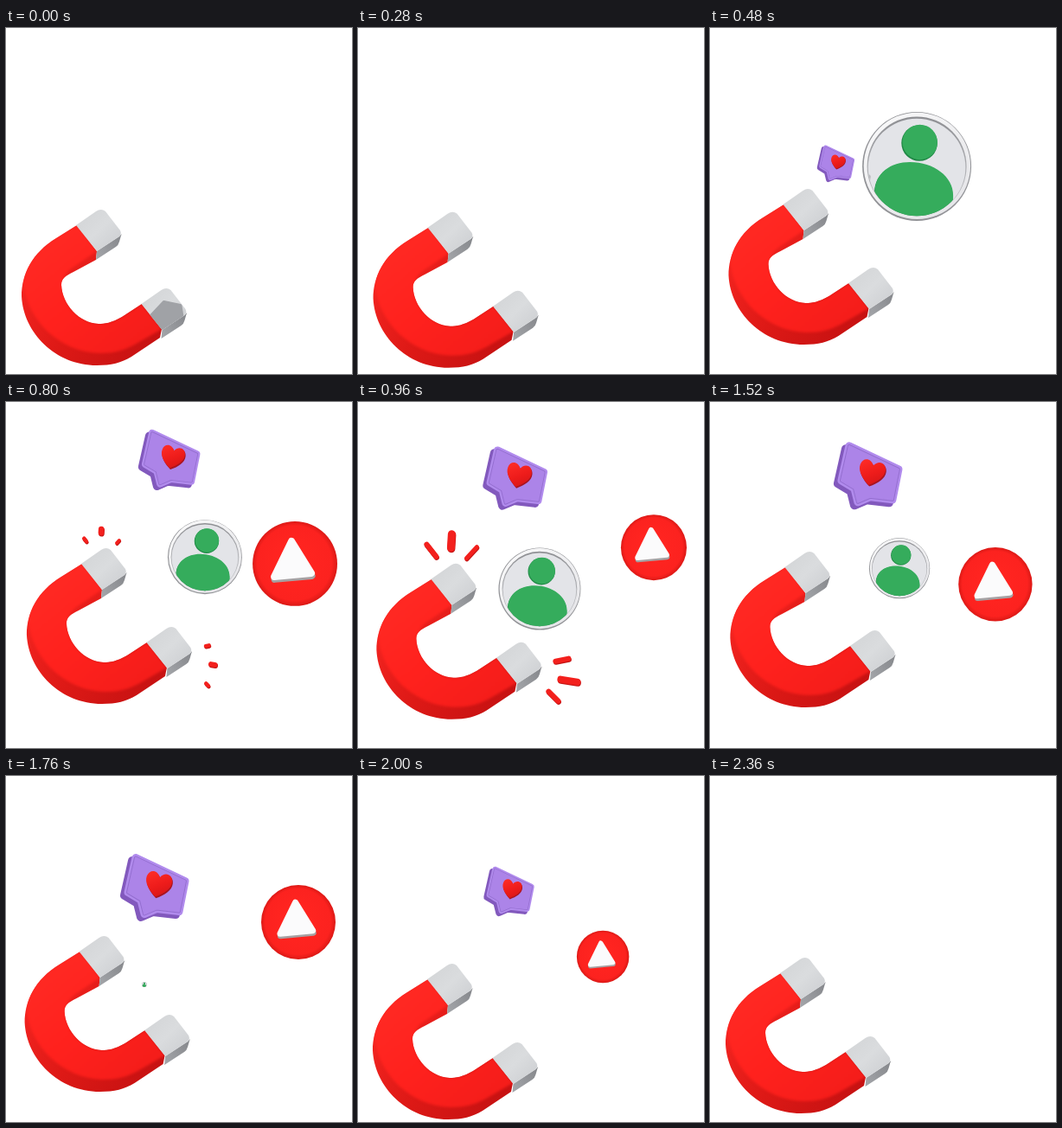
Animation, 400 px wide and 400 px high, one loop 2.4 s. Source, as an HTML page with a canvas:

```html
<!DOCTYPE html>
<html lang="en">
<head>
<meta charset="utf-8">
<title>Magnet</title>
<style>
html, body { margin: 0; width: 100%; height: 100%; overflow: hidden; background: #fff; }
canvas { display: block; width: 400px; height: 400px; }
</style>
</head>
<body>
<canvas id="stage" width="400" height="400"></canvas>
<script>
const ctx = document.getElementById('stage').getContext('2d');
const LOOP = 2400;

// Tracks: [time, values...]
const magnetTrack = [[0, 0], [200, 8], [480, -24], [770, -42], [800, -41], [960, -23.5], [1160, 6],
  [1280, -2], [1590, -41], [1760, -25], [1985, 7], [2240, 4], [2360, 0], [2400, 0]];
const profileTrack = [[300, 165, 235, 0], [480, 239, 160, 63], [560, 243, 157, 62], [800, 230, 179, 43],
  [960, 210, 216, 47.5], [1010, 208, 219, 47.5], [1280, 242, 174, 47.5], [1360, 245, 170, 47.5],
  [1760, 160, 241, 3], [1800, 157, 243, 0]];
const bubbleTrack = [[400, 150, 220, 0], [480, 145, 157, .54], [560, 172, 102, .92], [740, 189, 62, .91],
  [800, 188, 66, .9], [960, 181, 87, .94], [1120, 178, 103, .97], [1280, 176, 101, .98],
  [1440, 184, 76, 1], [1760, 171, 128, 1], [1920, 179, 94, 1], [2160, 160, 240, 0]];
const ballTrack = [[560, 180, 235, 0], [690, 330, 194, 53], [800, 334, 187, 49], [950, 342, 168, 38],
  [1120, 336, 197, 41], [1280, 326, 232, 42.5], [1350, 325, 236, 42.5], [1760, 338, 169, 43],
  [1900, 334, 185, 43], [2180, 170, 245, 0]];

// Spark rays in magnet space: inner end, outer end, width
const sparks = [[87, 202, 76, 188, 6], [104, 192, 105, 176, 9], [122, 204, 134, 191, 5],
  [225, 323, 240, 320, 6], [231, 344, 250, 347, 8], [228, 369, 217, 358, 6]];

const body = new Path2D('M82 228L58 243C30 260 18 285 18 310C20 352 57 390 105 390C122 390 133 387 145 380L178 358L180 348L157 319L134 334C122 341 114 342 107 342C85 341 65 320 64 297C64 290 68 287 78 282L104 268L105 258Z');
const bodyTop = new Path2D('M82 228L58 243C35 258 21 275 20 296C25 337 60 374 108 376C125 376 135 373 147 367L180 348L157 319L134 334C122 341 114 342 107 342C83 341 64 318 65 297C66 287 70 281 80 275L105 258Z');
const pole = new Path2D('M81 228L104 212Q110 208 115 212L132 234Q134 238 131 241L105 258Z');
const poleSide = new Path2D('M105 258L131 241Q135 236 133 240L131 247Q130 251 127 253L104 268Z');
const torso = new Path2D('M-48 36C-52 10 -32 -5 -8 -5C20 -5 42 12 42 33L42 70L-48 70Z');
const bubble = new Path2D('M-22 -33L35 -6L28 29L2 26L-12 32L-16 16L-31 7Z');
const heart = new Path2D('M0 15C-9 9 -16 2 -15 -6C-14 -15 -4 -16 0 -8C4 -16 14 -15 15 -6C16 2 9 9 0 15Z');
const triangle = new Path2D('M-4 -26L19 11L-24 15Z');

function at(track, t) {
  const last = track.length - 1;
  if (t <= track[0][0]) return track[0].slice(1);
  if (t >= track[last][0]) return track[last].slice(1);
  const i = track.findIndex(k => k[0] > t) - 1;
  const a = track[i], b = track[i + 1], h = b[0] - a[0], u = (t - a[0]) / h;
  const slope = (j, n) => (track[j + 1][n] - track[j][n]) / (track[j + 1][0] - track[j][0]);
  const tangent = (j, n) => {
    if (j === 0 || j === last) return 0;
    const p = slope(j - 1, n), q = slope(j, n);
    return p * q > 0 ? 2 * p * q / (p + q) : 0;
  };
  return a.slice(1).map((v, k) => {
    const n = k + 1, w = 1 - u;
    return w * w * (1 + 2 * u) * v + u * u * (3 - 2 * u) * b[n]
      + h * u * w * (w * tangent(i, n) - u * tangent(i + 1, n));
  });
}

const ease = u => { u = Math.max(0, Math.min(1, u)); return u * u * (3 - 2 * u); };

function placed(x, y, scale, draw) {
  ctx.save();
  ctx.translate(x, y);
  ctx.scale(scale, scale);
  draw();
  ctx.restore();
}

function fill(path, color) {
  ctx.fillStyle = color;
  ctx.fill(path);
}

// Filled path with rounded corners
function rounded(path, color, width) {
  ctx.lineWidth = width;
  ctx.lineJoin = 'round';
  ctx.strokeStyle = color;
  ctx.stroke(path);
  fill(path, color);
}

function circle(x, y, r, color) {
  ctx.beginPath();
  ctx.arc(x, y, r, 0, 7);
  ctx.fillStyle = color;
  ctx.fill();
}

function linear(x0, y0, x1, y1, ...colors) {
  const g = ctx.createLinearGradient(x0, y0, x1, y1);
  colors.forEach((c, i) => g.addColorStop(i / (colors.length - 1), c));
  return g;
}

function drawPole(shade) {
  fill(poleSide, linear(104, 262, 134, 240, '#a2a4a8', '#85878b'));
  fill(pole, linear(90, 215, 125, 252, '#d4d6d8', '#dadcde', '#cfd1d4'));
  if (shade > 0) {
    ctx.save();
    ctx.clip(pole);
    ctx.globalAlpha = shade;
    rounded(new Path2D('M91 243L107 226L126 230L128 243L105 258Z'), '#a0a2a6', 4);
    ctx.restore();
  }
}

function drawMagnet(t) {
  fill(body, linear(20, 290, 150, 390, '#f32420', '#dd1916', '#c71212'));
  ctx.save();
  ctx.clip(body);
  ctx.filter = 'blur(1.5px)';
  fill(bodyTop, linear(40, 250, 140, 370, '#ff2923', '#ff211d', '#f51d1a'));
  ctx.restore();
  drawPole(0);
  placed(75.5, 91, 1, () => drawPole(1 - ease(t / 80)));
}

function drawSparks(t) {
  const head = ease((t - 730) / 220), tail = ease((t - 970) / 150);
  if (head <= 0 || tail >= 1) return;
  ctx.lineCap = 'round';
  for (const [x0, y0, x1, y1, w] of sparks) {
    const line = (dx, dy, color) => {
      ctx.beginPath();
      ctx.moveTo(x0 + (x1 - x0) * tail + dx, y0 + (y1 - y0) * tail + dy);
      ctx.lineTo(x0 + (x1 - x0) * head + dx, y0 + (y1 - y0) * head + dy);
      ctx.lineWidth = w * Math.min(1, head * 3) * (1 - tail * .5);
      ctx.strokeStyle = color;
      ctx.stroke();
    };
    line(.5, 1.2, '#c51515');
    line(0, 0, '#f3201d');
  }
}

function drawProfile([x, y, r], [bx, by, bs]) {
  placed(x, y, r / 63, () => {
    circle(0, 0, 63, '#929397');
    circle(.3, -.6, 61.7, linear(-40, -50, 40, 50, '#f7f7f8', '#e6e6e9'));
    circle(0, 0, 57.5, linear(0, -57, 0, 57, '#8e8f93', '#c6c7cb'));
    circle(0, 1, 56.3, '#e3e4e8');
    ctx.clip();
    placed(0, 0, 63 / r, () => placed(bx + 19 - x, by + 19 - y, bs, () => rounded(bubble, '#bcbdc0', 10)));
    placed(-.5, 1, 1, () => fill(torso, '#1f8845'));
    fill(torso, '#35ac5c');
    circle(3, -27, 20.8, '#1f8845');
    circle(3.6, -28, 20.2, '#35ac5c');
  });
}

function drawBubble([x, y, s]) {
  placed(x, y, s, () => {
    placed(-3, 3, 1, () => rounded(bubble, '#8259bd', 10));
    placed(1, -.5, 1, () => {
      rounded(bubble, '#b18bed', 9);
      rounded(bubble, '#946ed0', 4);
      rounded(bubble, '#ac84e8', 2);
    });
    ctx.translate(5, -3);
    ctx.rotate(.24);
    placed(1.2, 1.5, 1, () => fill(heart, '#a91420'));
    fill(heart, linear(-8, -12, 10, 14, '#fb2a25', '#ee1c1b', '#d51517'));
  });
}

function drawBall([x, y, r]) {
  placed(x, y, r / 49, () => {
    const g = ctx.createRadialGradient(-3, -4, 20, 0, 0, 49);
    g.addColorStop(0, '#ff2420');
    g.addColorStop(.8, '#fc221f');
    g.addColorStop(1, '#db1916');
    circle(0, 0, 49, g);
    placed(.5, 3, 1, () => rounded(triangle, '#a5a1a3', 8));
    rounded(triangle, '#fbfbfc', 8);
  });
}

function frame(now) {
  const t = now % LOOP;
  const [dy] = at(magnetTrack, t);
  const profile = at(profileTrack, t), bubblePose = at(bubbleTrack, t), ball = at(ballTrack, t);
  ctx.clearRect(0, 0, 400, 400);
  placed(-dy * .145, dy, 1, () => { drawMagnet(t); drawSparks(t); });
  if (profile[2] > .1) drawProfile(profile, bubblePose);
  if (ball[2] > .1) drawBall(ball);
  if (bubblePose[2] > .01) drawBubble(bubblePose);
}

const start = performance.now();
(function tick() {
  frame(performance.now() - start);
  requestAnimationFrame(tick);
})();
</script>
</body>
</html>
```
